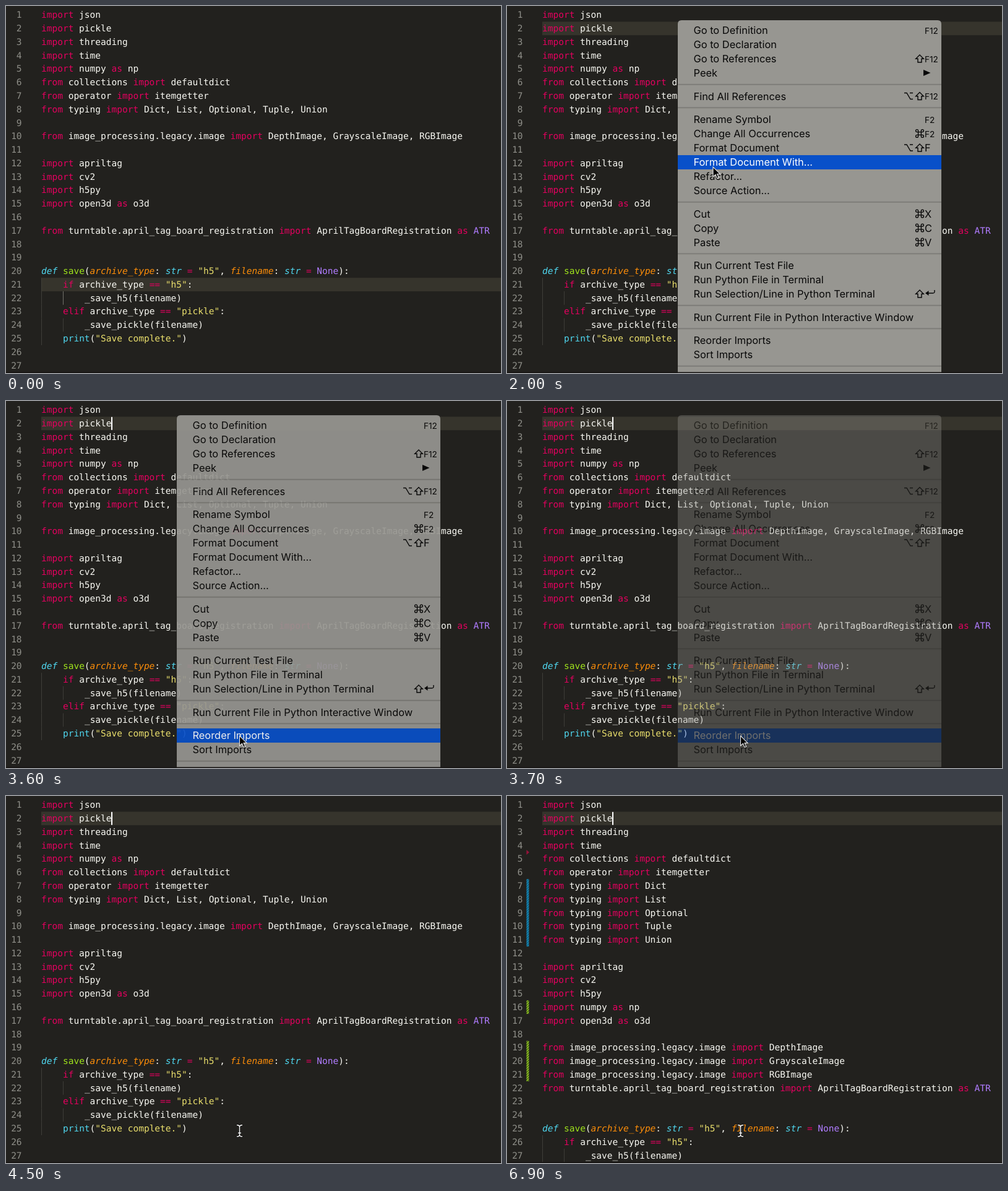
Animation of 800 by 593 pixels, one loop 7000 ms. Source, as an HTML page:

```html
<!DOCTYPE html>
<html lang="en">
<head>
<meta charset="utf-8">
<title>Reorder imports</title>
<style>
  html, body { margin: 0; width: 100%; height: 100%; overflow: hidden; background: #22211e; }
  svg { display: block; width: 100vw; height: 100vh; }
  text { white-space: pre; text-rendering: geometricPrecision; }
  .code text { font: 14.517px "DejaVu Sans Mono", monospace; fill: #f8f8f2; }
  .code .num { fill: #8f8f89; text-anchor: end; }
  .code .key { fill: #e4005f; }
  .code .type { fill: #4fd6ee; font-style: italic; }
  .code .call { fill: #4fd6ee; }
  .code .func { fill: #9fe21c; }
  .code .param { fill: #fd8d09; font-style: italic; }
  .code .const { fill: #b07cff; }
  .code .str { fill: #e9de6c; }
  .guide { fill: #403f39; }
  .menu text { font: 16.4px Inter, "Open Sans", sans-serif; fill: #080808; }
  .menu .small { font-size: 13.6px; }
  .menu .on text { fill: #fff; }
  .menu .bar { fill: #0850c9; visibility: hidden; }
  .menu .on .bar { visibility: visible; }
  .menu .sign { fill: none; stroke: #080808; stroke-width: 1.4; }
</style>
</head>
<body>
<svg id="stage" viewBox="0 0 800 593">
  <defs>
    <pattern id="blue" width="4" height="4" patternUnits="userSpaceOnUse">
      <rect width="4" height="4" fill="#0b5a86"/>
      <path d="M-1 1L1-1M0 4L4 0M3 5L5 3" stroke="#1c8fb4" stroke-width="1.3"/>
    </pattern>
    <pattern id="green" width="4" height="4" patternUnits="userSpaceOnUse">
      <rect width="4" height="4" fill="#3d5316"/>
      <path d="M-1 1L1-1M0 4L4 0M3 5L5 3" stroke="#9cd524" stroke-width="1.5"/>
    </pattern>
  </defs>
  <rect width="800" height="593" fill="#22211e"/>
  <rect id="line" x="57" width="743" height="21.8" fill="#36342c"/>
  <g id="before" class="code"></g>
  <g id="after" class="code"></g>
  <g id="marks"></g>
  <rect id="caret" width="2" height="21" fill="#fff"/>
  <g id="menu" class="menu"></g>
  <rect y="591.5" width="800" height="1.5" fill="#151311"/>
  <g id="beam" fill="none" stroke-linecap="round"></g>
  <path id="arrow" d="M0 0V16L4 12.5L6.6 18.6L9.2 17.5L6.6 11.6H11.6Z" fill="#000" stroke="#e8e8e8" stroke-width="1.1"/>
</svg>
<script>
const LOOP = 7000, STEP = 100;
const LEFT = 57, TOP = 3.6, PITCH = 21.78, CHAR = 8.74;
const CLICK = 1500, MENU = 1600, CLOSE = 3800, EDIT = 4600, MARKS = 4800;

const $ = id => document.getElementById(id);
const lineTop = n => TOP + (n - 1) * PITCH;

function add(parent, tag, attrs, text) {
  const el = document.createElementNS("http://www.w3.org/2000/svg", tag);
  for (const k in attrs) el.setAttribute(k, attrs[k]);
  if (text !== undefined) el.textContent = text;
  return parent.appendChild(el);
}

// Code listings
const head = `import json
import pickle
import threading
import time
import numpy as np
from collections import defaultdict
from operator import itemgetter
from typing import Dict, List, Optional, Tuple, Union

from image_processing.legacy.image import DepthImage, GrayscaleImage, RGBImage

import apriltag
import cv2
import h5py
import open3d as o3d

from turntable.april_tag_board_registration import AprilTagBoardRegistration as ATR
`;

const sortedHead = `import json
import pickle
import threading
import time
from collections import defaultdict
from operator import itemgetter
from typing import Dict
from typing import List
from typing import Optional
from typing import Tuple
from typing import Union

import apriltag
import cv2
import h5py
import numpy as np
import open3d as o3d

from image_processing.legacy.image import DepthImage
from image_processing.legacy.image import GrayscaleImage
from image_processing.legacy.image import RGBImage
from turntable.april_tag_board_registration import AprilTagBoardRegistration as ATR
`;

const body = `

def save(archive_type: str = "h5", filename: str = None):
    if archive_type == "h5":
        _save_h5(filename)
    elif archive_type == "pickle":
        _save_pickle(filename)
    print("Save complete.")

`;

const rules = [
  ["str", '"[^"]*"'],
  ["key", "\\b(?:import|from|as|if|elif)\\b|=+"],
  ["type", "\\b(?:def|str)\\b"],
  ["call", "\\bprint\\b"],
  ["func", "\\bsave\\b"],
  ["const", "\\b(?:None|ATR)\\b"],
  ["param", "\\b(?:archive_type|filename)(?=:)"],
];
const lexer = new RegExp(rules.map(([name, re]) => `(?<${name}>${re})`).join("|"), "g");

function drawCode(group, source) {
  source.split("\n").slice(0, 27).forEach((line, i) => {
    const top = lineTop(i + 1), y = top + 15.7;
    const code = line.trimStart(), indent = line.length - code.length;
    for (let c = 0; c < indent; c += 4) {
      const guide = add(group, "rect", { x: LEFT + c * CHAR, y: top, width: 1, height: PITCH, class: "guide" });
      if (c && i === 21) guide.id = "scope";
    }
    add(group, "text", { x: 25.6, y, class: "num" }, i + 1);
    const text = add(group, "text", { x: LEFT + indent * CHAR, y });
    let pos = 0;
    for (const m of code.matchAll(lexer)) {
      const name = Object.keys(m.groups).find(k => m.groups[k]);
      text.append(code.slice(pos, m.index));
      add(text, "tspan", { class: name }, m[0]);
      pos = m.index + m[0].length;
    }
    text.append(code.slice(pos));
  });
}
drawCode($("before"), head + body);
drawCode($("after"), sortedHead + body);

// Change marks in the gutter
for (const [from, to, ink] of [[7, 11, "blue"], [16, 16, "green"], [19, 21, "green"]])
  add($("marks"), "rect", { x: 31.5, y: lineTop(from), width: 4, height: (to - from + 1) * PITCH, fill: `url(#${ink})` });
add($("marks"), "path", { d: "M31.5 87L36 91L31.5 95Z", fill: "#97123a" });

// Context menu: label, modifier signs, key; null is a separator
const entries = [
  ["Go to Definition", "", "F12"], ["Go to Declaration"], ["Go to References", "s", "F12"], ["Peek", "", "more"], null,
  ["Find All References", "os", "F12"], null,
  ["Rename Symbol", "", "F2"], ["Change All Occurrences", "c", "F2"], ["Format Document", "os", "F"],
  ["Format Document With..."], ["Refactor..."], ["Source Action..."], null,
  ["Cut", "c", "X"], ["Copy", "c", "C"], ["Paste", "c", "V"], null,
  ["Run Current Test File"], ["Run Python File in Terminal"], ["Run Selection/Line in Python Terminal", "s", "return"], null,
  ["Run Current File in Python Interactive Window"], null,
  ["Reorder Imports"], ["Sort Imports"], null,
];
const signs = {
  s: "M0-6L6.3.3H3V6H-3V.3H-6.3Z",
  o: "M-7-5H-3L3 5H7M2-5H7",
  c: "M-2.4 2.4V-4.4a2 2 0 1 0-2 2H4.4a2 2 0 1 0-2-2V4.4a2 2 0 1 0 2-2H-4.4a2 2 0 1 0 2 2Z",
};
const menu = $("menu"), items = [];
add(menu, "path", { d: "M276 593V29q0-6 6-6H696q6 0 6 6V593Z", fill: "#979691" });

let rowY = 39;
for (const entry of entries) {
  if (!entry) {
    add(menu, "rect", { x: 276, y: rowY - 5.2, width: 426, height: 2, fill: "#7e7d79" });
    rowY += 14.5;
    continue;
  }
  const [label, mods = "", key = ""] = entry;
  const g = add(menu, "g", {});
  add(g, "rect", { x: 276, y: rowY - 11, width: 426, height: 23, class: "bar" });
  add(g, "text", { x: 301.5, y: rowY + 6 }, label);
  [...mods].reverse().forEach((m, i) =>
    add(g, "path", { d: signs[m], transform: `translate(${667 - i * 18} ${rowY})`, class: "sign" }));
  if (key === "more") {
    add(g, "path", { d: `M673 ${rowY - 5}L684.5 ${rowY}L673 ${rowY + 5}Z`, fill: "#080808" });
  } else if (key === "return") {
    const at = `translate(684 ${rowY})`;
    add(g, "path", { d: "M7-6V-3.5Q7-1 4.5-1H-3", transform: at, class: "sign" });
    add(g, "path", { d: "M-8-1L-2.5-5V3Z", transform: at, fill: "#080808" });
  } else if (key) {
    const small = key.length > 1;
    add(g, "text", { x: 675, y: rowY + (small ? 5.5 : 6), class: small ? "small" : "" }, key);
  }
  items.push({ g, y: rowY });
  rowY += 23;
}

// Text pointer
const beamPath = "M-4-9.3Q0-9.3 0-6V6Q0 9.3-4 9.3M4-9.3Q0-9.3 0-6M4 9.3Q0 9.3 0 6M-2 3.5H2";
add($("beam"), "path", { d: beamPath, stroke: "#000", "stroke-width": 3, opacity: .6 });
add($("beam"), "path", { d: beamPath, stroke: "#fff", "stroke-width": 1.4 });

// Pointer path: time, x, y
const path = [
  [1000, 318, 606], [1100, 304, 390], [1200, 284, 130], [1300, 274.5, 31],
  [1600, 275, 31], [1800, 299, 118], [2000, 333, 260],
  [2200, 358, 425], [2400, 375, 537], [2700, 377.5, 541],
];
function pointer(t) {
  const i = path.findIndex(p => p[0] > t);
  if (i === 0) return path[0].slice(1);
  if (i < 0) return path[path.length - 1].slice(1);
  const [t0, x0, y0] = path[i - 1], [t1, x1, y1] = path[i];
  const k = (t - t0) / (t1 - t0);
  return [x0 + (x1 - x0) * k, y0 + (y1 - y0) * k];
}

const show = (el, on) => { el.style.display = on ? "" : "none"; };

function render(t) {
  const clicked = t >= CLICK, edited = t >= EDIT, open = t >= MENU && t < CLOSE;
  const row = clicked ? 2 : 21, col = clicked ? 13 : 28;
  const blinkStart = edited ? EDIT : clicked ? CLICK : -800;

  $("line").setAttribute("y", lineTop(row));
  $("caret").setAttribute("x", LEFT + col * CHAR - .6);
  $("caret").setAttribute("y", lineTop(row) + .4);
  show($("caret"), (t - blinkStart) % 1000 < 500);
  $("scope").style.fill = clicked ? "" : "#74736c";

  show($("before"), !edited);
  show($("after"), edited);
  show($("marks"), t >= MARKS);

  const [x, y] = pointer(t);
  show(menu, open);
  menu.style.opacity = t < 3600 ? 1 : t < 3700 ? .92 : .35;
  for (const item of items) {
    const d = y - item.y;
    item.g.setAttribute("class", t > MENU && d >= -11 && d < 12 ? "on" : "");
  }
  show($("arrow"), open);
  show($("beam"), !open);
  for (const id of ["arrow", "beam"]) $(id).setAttribute("transform", `translate(${x} ${y})`);
}

const start = performance.now();
function tick() {
  const t = (performance.now() - start) % LOOP;
  render(Math.floor(t / STEP) * STEP);
  requestAnimationFrame(tick);
}
render(0);
requestAnimationFrame(tick);
</script>
</body>
</html>
```
